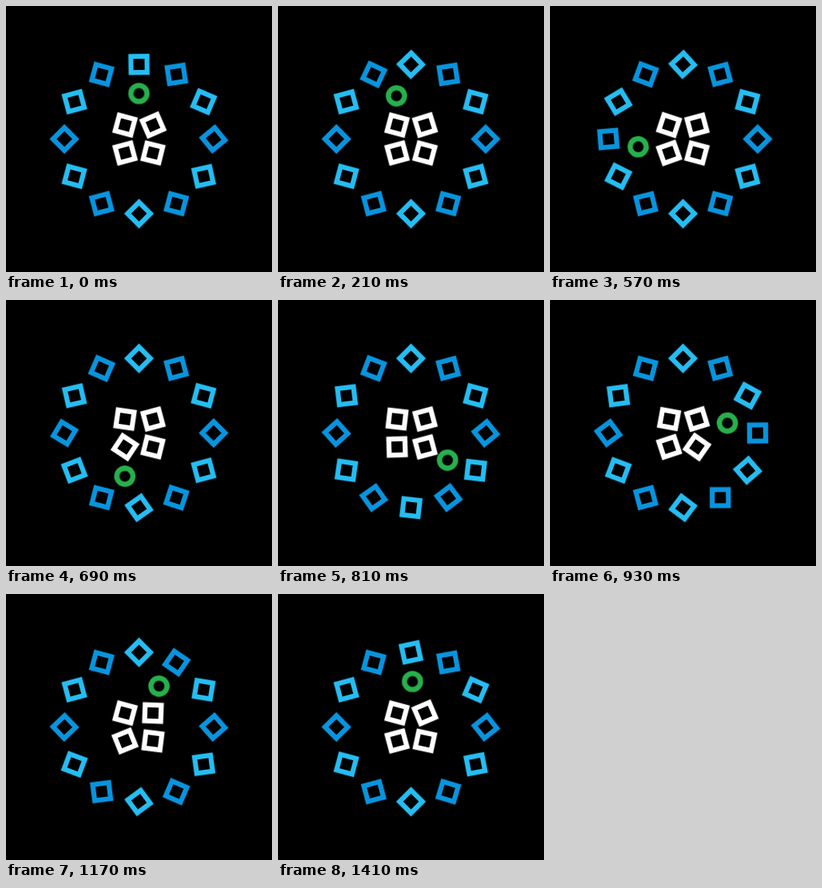
Recreate the animation shown at these times as an HTML page. Size 333 by 333 pixels, loop 1440 ms.

```html
<!DOCTYPE html>
<html lang="en">
<head>
<meta charset="utf-8">
<title>Loader</title>
<style>
  html, body { margin: 0; width: 100%; height: 100%; overflow: hidden; background: #000; }
  svg { display: block; width: 100vw; height: 100vh; }
  rect, circle { fill: none; }
</style>
</head>
<body>
<svg viewBox="0 0 333 333"><g id="stage" transform="translate(166.5 166.5)"></g></svg>
<script>
const LOOP = 1440;
const TURN = 800;
const ORBIT = [.67, .17, .33, .83];
const KICK = [.27, 0, .2, 1.48];
const LIGHT = '#25bdf2', DARK = '#0894de', WHITE = '#fff', GREEN = '#27b04b';

const stage = document.getElementById('stage');
const css = curve => `cubic-bezier(${curve})`;
const rotate = deg => `rotate(${deg}deg)`;

function add(parent, tag, attrs) {
  const el = document.createElementNS('http://www.w3.org/2000/svg', tag);
  for (const key in attrs) el.setAttribute(key, attrs[key]);
  return parent.appendChild(el);
}

const bezier = (a, b, s) =>
  3 * a * s * (1 - s) ** 2 + 3 * b * s * s * (1 - s) + s ** 3;

// Time at which the ring has covered the given share of its orbit
function passTime(share) {
  const [x1, y1, x2, y2] = ORBIT;
  let lo = 0, hi = 1;
  for (let i = 0; i < 40; i++) {
    const mid = (lo + hi) / 2;
    if (bezier(y1, y2, mid) < share) lo = mid; else hi = mid;
  }
  return LOOP * bezier(x1, x2, lo);
}

// A square that gets kicked a quarter turn as the ring goes by
function addSquare(angle, radius, tilt, turn, color) {
  const rad = angle * Math.PI / 180;
  const x = -radius * Math.sin(rad), y = -radius * Math.cos(rad);
  const spot = add(stage, 'g', { transform: `translate(${x} ${y})` });
  const size = 20.2;
  const square = add(spot, 'rect', {
    x: -size / 2, y: -size / 2, width: size, height: size,
    stroke: color, 'stroke-width': 6.2
  });
  const share = angle / 360;
  const lead = 120 + 70 * Math.abs(2 * share - 1);
  square.animate([
    { transform: rotate(tilt), easing: css(KICK) },
    { transform: rotate(tilt + turn), offset: TURN / LOOP },
    { transform: rotate(tilt + turn) }
  ], { duration: LOOP, iterations: Infinity, delay: passTime(share) - lead - LOOP });
}

for (let i = 0; i < 12; i++) {
  addSquare(i * 30, 93.4, 45 - i * 30, 90, i % 2 ? DARK : LIGHT);
}
for (let i = 0; i < 4; i++) {
  addSquare(45 + i * 90, 24.7, i % 2 ? -15 : 15, -90, WHITE);
}

const orbit = add(stage, 'g', {});
add(orbit, 'circle', { cy: -57, r: 10.1, stroke: GREEN, 'stroke-width': 6.5 });
orbit.animate(
  [{ transform: rotate(0) }, { transform: rotate(-360) }],
  { duration: LOOP, iterations: Infinity, easing: css(ORBIT) }
);
</script>
</body>
</html>
```
